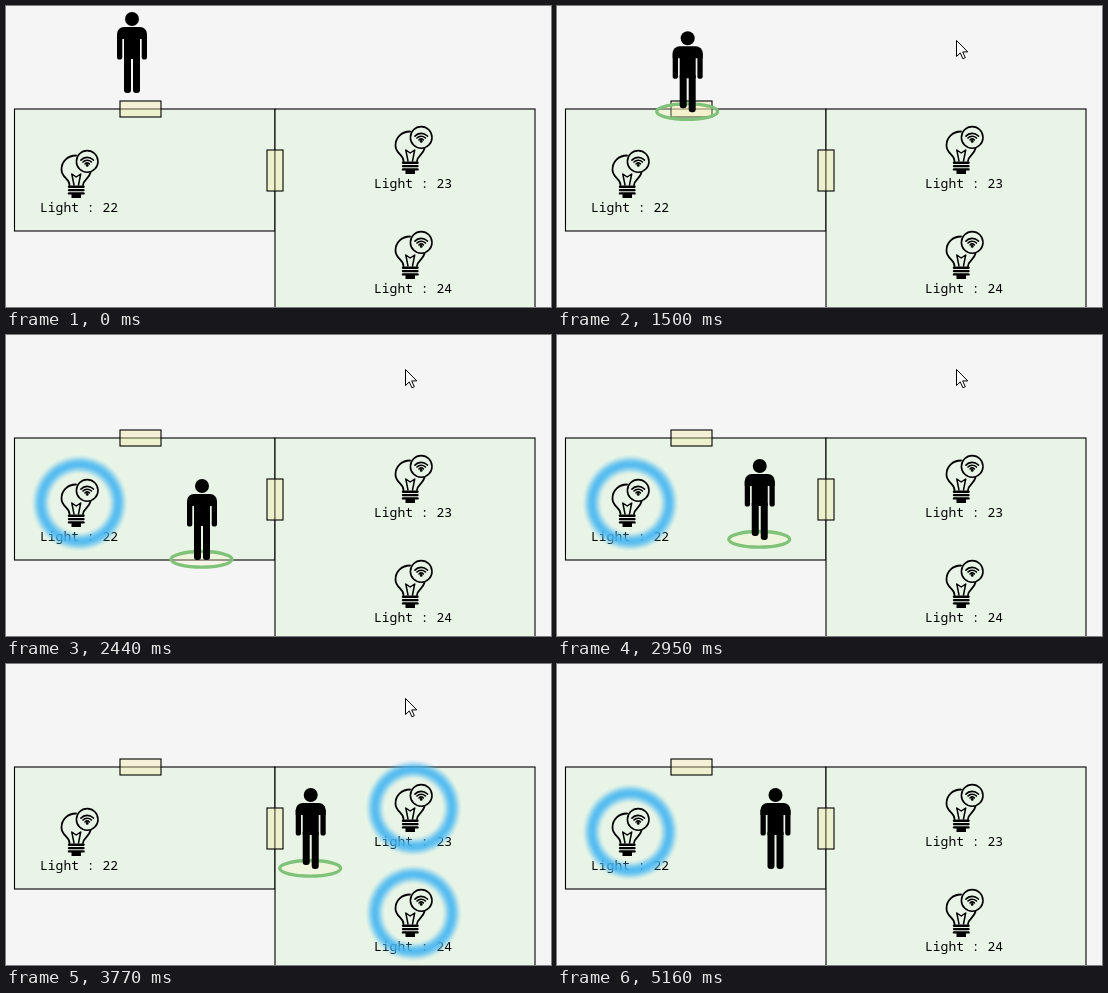
These frames come from a looping animation (545 by 301 pixels, 5230 ms). An HTML page with a canvas:

```html
<!DOCTYPE html>
<html lang="en">
<head>
<meta charset="utf-8">
<title>Smart lights</title>
<style>
  html, body { margin: 0; width: 100%; height: 100%; overflow: hidden; background: #f5f5f5; }
  canvas { display: block; }
</style>
</head>
<body>
<canvas id="stage" width="545" height="301"></canvas>
<script>
const ctx = document.getElementById('stage').getContext('2d');
const LOOP = 5230;
const TAU = Math.PI * 2;
const WALL = 269;

// The picture advances in bursts of even steps: first, last, count.
const bursts = [
  [50, 560, 8], [680, 750, 2], [1240, 1760, 9], [1830, 2320, 9],
  [2390, 2690, 5], [2950, 3440, 9], [3510, 3580, 2], [3770, 4290, 9], [4720, 4840, 3]
];

// Each leg of a route: from time, to time, destination.
const walk = {
  x: 125.5, y: 86,
  legs: [
    [1180, 1760, 134, 121], [1760, 2010, 135, 165], [2010, 2370, 195.5, 224],
    [2450, 2630, 195.5, 204], [2915, 3535, 315, 204], [3710, 4250, 218, 204]
  ]
};
const pointer = {
  x: 519, y: 281,
  legs: [[50, 500, 130, 40], [620, 750, 399, 34], [4650, 4840, 540, 301]]
};

const lamps = [
  { label: 'Light : 22', x: 0, y: 0 },
  { label: 'Light : 23', x: 334, y: -24 },
  { label: 'Light : 24', x: 334, y: 81 }
];

function along(route, t) {
  let { x, y } = route;
  for (const [from, to, toX, toY] of route.legs) {
    const k = Math.min(1, Math.max(0, (t - from) / (to - from)));
    x += (toX - x) * k;
    y += (toY - y) * k;
  }
  return { x, y };
}

function snap(t) {
  const burst = bursts.filter(([first]) => first <= t).pop();
  if (!burst) return 0;
  const [first, last, count] = burst;
  const step = (last - first) / (count - 1);
  const n = Math.floor((t - first) / step + 0.25);
  return Math.round(Math.min(last, first + n * step));
}

function box(x, y, w, h, fill) {
  ctx.fillStyle = fill;
  ctx.fillRect(x, y, w, h);
  ctx.strokeStyle = '#000';
  ctx.lineWidth = 1.1;
  ctx.strokeRect(x, y, w, h);
}

function line(...points) {
  ctx.beginPath();
  points.forEach(([x, y]) => ctx.lineTo(x, y));
  ctx.stroke();
}

function arc(x, y, r, from = 0, to = TAU) {
  ctx.beginPath();
  ctx.arc(x, y, r, from, to);
}

function drawHouse() {
  ctx.fillStyle = '#f5f5f5';
  ctx.fillRect(0, 0, 545, 301);
  box(8.5, 103, WALL - 8.5, 122, '#e8f5e6');
  box(WALL, 103, 260, 240, '#e8f5e6');
  const door = 'rgba(242, 236, 170, 0.4)';
  box(114, 95, 41, 16, door);
  box(261, 144, 16, 41, door);
}

function drawBulb() {
  ctx.strokeStyle = ctx.fillStyle = '#000';
  ctx.lineCap = ctx.lineJoin = 'round';

  // Glass, open behind the badge
  ctx.lineWidth = 1.8;
  ctx.beginPath();
  ctx.moveTo(63.5, 179);
  ctx.bezierCurveTo(63.5, 172, 55.5, 172, 55.5, 163.5);
  ctx.bezierCurveTo(55.5, 155, 62, 149.5, 70, 149.5);
  ctx.moveTo(77, 179);
  ctx.bezierCurveTo(77, 174, 83, 173, 84.5, 166.5);
  ctx.stroke();

  // Filament
  ctx.lineWidth = 1.5;
  line([68, 179], [65.8, 168], [70.2, 171], [74.7, 168], [72.5, 179]);

  // Screw base
  ctx.lineWidth = 2.4;
  for (let i = 0; i < 3; i++) line([63, 180.8 + i * 3.3], [77.5, 180.8 + i * 3.3]);
  ctx.fillRect(65.5, 188, 9.5, 4);

  // Wireless badge
  ctx.lineWidth = 1.6;
  arc(81.2, 155.4, 10.8);
  ctx.stroke();
  for (let r = 3; r < 9; r += 2.8) {
    arc(81.2, 160, r, -Math.PI * 0.76, -Math.PI * 0.24);
    ctx.stroke();
  }
  arc(81.2, 159.4, 1.4);
  ctx.fill();
}

function drawGlow() {
  const mid = 38.5, half = 10;
  const g = ctx.createRadialGradient(73.5, 168, mid - half, 73.5, 168, mid + half);
  for (let k = 0; k <= 1; k += 0.125) {
    g.addColorStop(k, `rgba(68, 181, 242, ${0.9 * Math.sin(Math.PI * k) ** 1.6})`);
  }
  ctx.fillStyle = g;
  arc(73.5, 168, mid + half);
  ctx.fill();
}

function drawLamp(lamp, on) {
  ctx.save();
  ctx.translate(lamp.x, lamp.y);
  ctx.fillStyle = '#000';
  ctx.font = '13px "Noto Sans Mono", "DejaVu Sans Mono", monospace';
  ctx.textAlign = 'center';
  ctx.fillText(lamp.label, 73, 206);
  if (on) drawGlow();
  drawBulb();
  ctx.restore();
}

function drawRing({ x, y }) {
  ctx.beginPath();
  ctx.ellipse(x, y + 0.3, 30.5, 7.8, 0, 0, TAU);
  ctx.fillStyle = 'rgba(255, 240, 200, 0.3)';
  ctx.fill();
  ctx.strokeStyle = '#80c27a';
  ctx.lineWidth = 3.3;
  ctx.stroke();
}

function drawPerson({ x, y }, stepping) {
  const part = (left, top, w, h, radii = 0) => {
    ctx.beginPath();
    ctx.roundRect(left, top, w, h, radii);
    ctx.fill();
  };
  ctx.save();
  ctx.translate(x + 0.5, y);
  ctx.fillStyle = '#000';
  arc(0, -73, 7);
  ctx.fill();
  part(-15, -65, 30, 12, [7, 7, 0, 0]);
  part(-8, -55, 16, 22);
  for (const left of [-15, 9.7]) part(left, -58, 5.3, 25.5, [0, 0, 2.6, 2.6]);
  part(-8, -36, 7, stepping ? 33 : 37, [0, 0, 3, 3]);
  part(1, -36, 7, 37, [0, 0, 3, 3]);
  ctx.restore();
}

function drawPointer({ x, y }) {
  ctx.save();
  ctx.translate(x + 0.5, y + 0.5);
  ctx.beginPath();
  [[0, 0], [0, 16], [3.8, 12.4], [6.4, 18.3], [8.8, 17.2], [6.2, 11.4], [11.3, 11.4]]
    .forEach(([px, py]) => ctx.lineTo(px, py));
  ctx.closePath();
  ctx.fillStyle = '#fff';
  ctx.fill();
  ctx.strokeStyle = '#000';
  ctx.lineWidth = 1;
  ctx.lineJoin = 'miter';
  ctx.stroke();
  ctx.restore();
}

function draw(time) {
  const t = snap(time);
  const feet = along(walk, t);
  const before = along(walk, t - 20);
  const stepping = Math.hypot(feet.x - before.x, feet.y - before.y) > 0.3;
  const inRight = feet.x > WALL;
  const inLeft = t >= 2070 && !inRight;

  drawHouse();
  lamps.forEach((lamp, i) => drawLamp(lamp, i ? inRight : inLeft));
  if (t >= 560 && time < 5160) drawRing(feet);
  drawPerson(feet, stepping);
  if (t >= 50 && t < 4840) drawPointer(along(pointer, t));
}

const start = performance.now();
function frame() {
  draw((performance.now() - start) % LOOP);
  requestAnimationFrame(frame);
}
frame();
</script>
</body>
</html>
```
